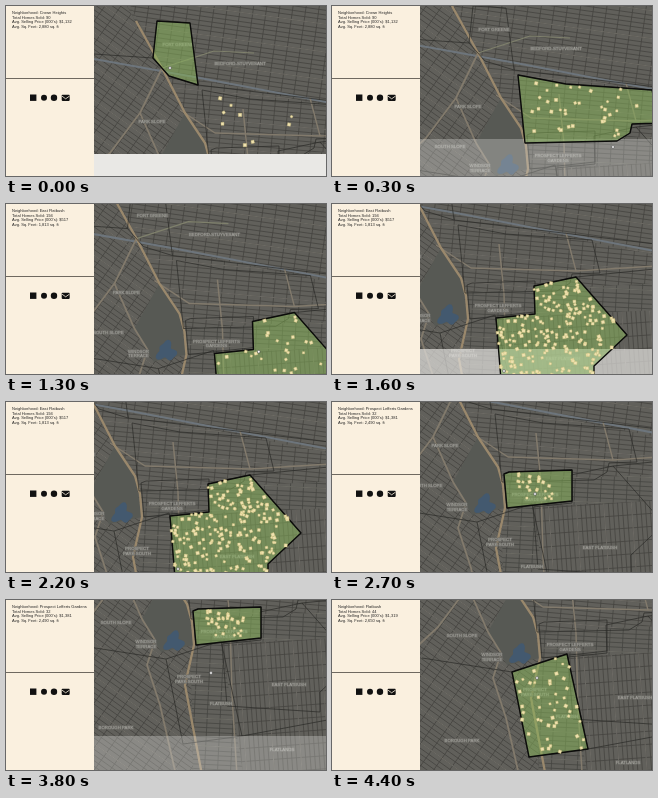
Recreate the animation shown at these times as an HTML page with a canvas. Size 320x170 px, loop 4.5 s.

```html
<!DOCTYPE html>
<html lang="en">
<head>
<meta charset="utf-8">
<title>Home sales map</title>
<style>
  html, body { margin: 0; width: 100%; height: 100%; overflow: hidden; background: #faf0df; }
  #stage { position: relative; width: 320px; height: 170px; overflow: hidden; }
  canvas, svg { position: absolute; left: 0; top: 0; width: 320px; height: 170px; }
  text { font-family: "Liberation Sans", Arial, sans-serif; font-size: 4.05px; fill: #222; }
</style>
</head>
<body>
<div id="stage">
  <canvas id="map"></canvas>
  <svg viewBox="0 0 320 170">
    <rect width="88" height="170" fill="#faf0df"/>
    <g id="stats">
      <text x="6" y="8"></text>
      <text x="6" y="12.6"></text>
      <text x="6" y="17.2"></text>
      <text x="6" y="21.8"></text>
    </g>
    <path d="M0 72.5H88" stroke="#6f6960"/>
    <g fill="#111">
      <rect x="24" y="88.5" width="6.4" height="6.4"/>
      <circle cx="38" cy="91.7" r="3"/>
      <circle cx="48" cy="91.7" r="3.2"/>
      <rect x="55.7" y="88.7" width="8" height="6.2" rx=".8"/>
      <path d="M55.8 90l3.9 2.8 3.9-2.8" fill="none" stroke="#faf0df" stroke-width=".8"/>
    </g>
  </svg>
</div>
<script>
const LOOP = 4500, STEP = 100, PAN = 300, FAR = 420;
const canvas = document.getElementById('map');
const ctx = canvas.getContext('2d');
const ratio = Math.max(1, window.devicePixelRatio || 1);
canvas.width = 320 * ratio;
canvas.height = 170 * ratio;
const lines = document.querySelectorAll('#stats text');

// Map coordinates are relative to the park lake.
const line = d => new Path2D('M' + d);
const shape = d => new Path2D('M' + d + 'Z');

const areas = {
  north: shape('-37-158L-4-156 4-94-25-103-41-121'),
  crown: shape('8-89L56-80 142-74 150-41 122-40 120-31 107-23 15-21'),
  east: shape('46 4L85 0 84-28 126-37 177 21 144 52 144 72 51 66'),
  gardens: shape('17-29L22-31 85-33 85-2 20 5'),
  flatbush: shape('-10 19L45 1 66 96 7 104')
};
const park = shape('-9-66L11-36 18 5-15 12-34-21');
const borders = line('-100-125L-41-121M4-94L205-70M126-37L205-45M-10 19L-100 5M66 96L205 70');

// Street blocks fan out from a corner: x, y, first and last bearing, street angle
const blocks = [
  [0, 0, 0, 6.3, .62],
  [14, -21, -2.06, 1.55, .05],
  [45, 4, -.05, 1.4, 1.5],
  [14, -21, -2.06, -.05, .09],
  [-28, -106, -2.06, .2, .14]
].map(([x, y, from, to, angle]) => {
  const clip = new Path2D();
  clip.moveTo(x, y);
  clip.arc(x, y, FAR, from, to);
  return { clip, angle };
});

const TAN = '#9a886c', DULL = '#827a6c';
const roads = [
  ['-100-120L6-101 205-63', 2, '#6d757c'],
  ['-32-111L20-128 60-126', 1.2, '#7f806c'],
  ['-14-69L21-46 126-43 205-48M126-43L116-81', 1.4, DULL],
  ['49-70L54-20 56 55 61 135', 1.5, DULL],
  ['-32-111L-54-66-84-26-112 0', 1.8, DULL],
  ['-54-66L-34-21-21 0-29 25-16 65 0 135', 1.8, DULL],
  ['-58-158L-32-111-9-66 11-36 16-18 18 5 9 45 19 98 26 135', 2.3, TAN]
];

const labels = [
  ['EAST FLATBUSH', 113, 46], ['SOUTH SLOPE', -60, -16], ['BOROUGH PARK', -60, 89],
  ['WINDSOR|TERRACE', -30, 3], ['PROSPECT|PARK SOUTH', 13, 38], ['FLATBUSH', 45, 65],
  ['FLATLANDS', 106, 111], ['PARK SLOPE', -42, -56], ['BEDFORD-STUYVESANT', 46, -114],
  ['PROSPECT LEFFERTS|GARDENS', 48, -7], ['FORT GREENE', -16, -133]
];

function seeded(seed) {
  return () => (seed = (seed * 16807) % 2147483647) / 2147483647;
}

// Scatter homes around a centre, keeping those inside the area.
function scatter(area, count, [x, y, rx, ry]) {
  const rnd = seeded(count * 97), homes = [];
  while (homes.length < count) {
    const px = x + rx * (rnd() * 2 - 1), py = y + ry * (rnd() * 2 - 1);
    if (ctx.isPointInPath(area, px, py)) homes.push([px, py, 2 + rnd() * 1.3, rnd() - .5]);
  }
  return homes;
}

const sales = [
  { at: 0, lead: -100, area: 'crown', name: 'Crown Heights', sold: 90, price: '1,132', feet: '2,880', around: [78, -56, 56, 30] },
  { at: 1200, area: 'east', name: 'East Flatbush', sold: 194, price: '517', feet: '1,813', around: [106, 15, 60, 48] },
  { at: 2400, area: 'gardens', name: 'Prospect Lefferts Gardens', sold: 32, price: '1,381', feet: '2,490', around: [50, -16, 20, 14] },
  { at: 4000, area: 'flatbush', name: 'Flatbush', sold: 44, price: '1,319', feet: '2,650', around: [28, 52, 38, 48] }
];
for (const s of sales) s.homes = scatter(areas[s.area], s.sold, s.around);

// Each pan: start time, where the lake ends up, where the pointer ends up
const pans = [
  [-PAN, 188, 173, 164, 62],
  [0, 178, 158, 281, 141],
  [1200, 118, 110, 172, 167],
  [2400, 155, 101, 203, 92],
  [3200, 160, 71, 203, 80],
  [3500, 170, 40, 205, 73],
  [3900, 190, 53, 205, 78]
];

// Unloaded tiles: time they start to fade in, top edge
const tiles = [[0, -25], [1500, 35], [3500, 96]];

function view(t) {
  const i = pans.filter(p => p[0] <= t).length - 1;
  const from = pans[Math.max(0, i - 1)], to = pans[i];
  const p = Math.min(1, (t - to[0]) / PAN), e = p * p * (3 - 2 * p);
  return to.map((v, k) => from[k] + (v - from[k]) * e).slice(1);
}

function stroke(path, width, color) {
  ctx.lineWidth = width;
  ctx.strokeStyle = color;
  ctx.stroke(path);
}

function fill(path, color) {
  ctx.fillStyle = color;
  ctx.fill(path);
}

function parallels(gap, across) {
  const path = new Path2D();
  for (let v = -FAR; v < FAR; v += gap) {
    path.moveTo(...(across ? [v, -FAR] : [-FAR, v]));
    path.lineTo(...(across ? [v, FAR] : [FAR, v]));
  }
  return path;
}
const streets = parallels(4.6), avenues = parallels(13, true), wide = parallels(27.6);

function drawBlock({ clip, angle }) {
  ctx.save();
  ctx.clip(clip);
  ctx.fillStyle = '#61605b';
  ctx.fillRect(-FAR, -FAR, 2 * FAR, 2 * FAR);
  ctx.rotate(angle);
  stroke(streets, .75, '#454440');
  stroke(avenues, .75, '#454440');
  stroke(wide, .8, '#74726b');
  ctx.restore();
}

function drawLake() {
  const lake = new Path2D();
  for (let a = 0; a < 6.28; a += .2) {
    const r = 9 + 2.2 * Math.sin(3 * a) + 1.5 * Math.cos(5 * a);
    lake.lineTo(-2 + r * Math.cos(a), 2 + r * Math.sin(a));
  }
  fill(lake, '#43596f');
}

function drawLabel([name, x, y]) {
  name.split('|').forEach((part, i) => {
    ctx.lineWidth = 1.4;
    ctx.strokeStyle = '#6f6e69';
    ctx.strokeText(part, x, y + i * 4.6);
    ctx.fillStyle = '#a9a8a2';
    ctx.fillText(part, x, y + i * 4.6);
  });
}

function drawMap() {
  blocks.forEach(drawBlock);
  fill(park, '#575954');
  drawLake();
  roads.forEach(([d, width, color]) => stroke(line(d), width, color));
  stroke(borders, .7, '#2a2a28');
  Object.values(areas).forEach(a => stroke(a, .7, '#2a2a28'));
  ctx.font = '4.3px "Liberation Sans", Arial, sans-serif';
  ctx.textAlign = 'center';
  labels.forEach(drawLabel);
}

function drawHome([x, y, size, turn]) {
  ctx.save();
  ctx.translate(x, y);
  ctx.rotate(turn);
  ctx.fillStyle = '#efe2b0';
  ctx.fillRect(-size / 2, -size / 2, size, size);
  ctx.lineWidth = .4;
  ctx.strokeStyle = '#d5c582';
  ctx.strokeRect(-size / 2, -size / 2, size, size);
  ctx.restore();
}

function draw(t) {
  const sale = sales.filter(s => s.at <= t).pop();
  const [x, y, px, py] = view(t);
  const age = t - sale.at;
  ctx.setTransform(ratio, 0, 0, ratio, 0, 0);
  ctx.lineJoin = 'round';
  ctx.save();
  ctx.beginPath();
  ctx.rect(88, 0, 232, 170);
  ctx.clip();
  ctx.translate(x, y);
  drawMap();
  for (const [from, top] of tiles) {
    if (t < from || t > from + 500) continue;
    ctx.fillStyle = `rgba(233,232,229,${Math.exp((from - t) / 250)})`;
    ctx.fillRect(-FAR, top, 2 * FAR, FAR);
  }

  // The hover outline follows the new stats a moment later.
  const before = sales[sales.indexOf(sale) - 1];
  const area = areas[age >= 100 ? sale.area : before ? before.area : 'north'];
  fill(area, 'rgba(138,184,90,.5)');
  stroke(area, 1.4, '#0b0b0a');
  const shown = Math.min(1, (age - (sale.lead || 0)) / (sale.lead ? 1000 : 400));
  sale.homes.slice(0, Math.round(sale.sold * shown)).forEach(drawHome);
  ctx.restore();

  ctx.beginPath();
  ctx.arc(px, py, 1.4, 0, 7);
  ctx.fillStyle = '#fff';
  ctx.fill();
  ctx.lineWidth = .5;
  ctx.strokeStyle = '#333';
  ctx.stroke();

  [`Neighborhood: ${sale.name}`, `Total Homes Sold: ${sale.sold}`,
    `Avg. Selling Price (000's): $${sale.price}`, `Avg. Sq. Feet: ${sale.feet} sq. ft`
  ].forEach((s, i) => { lines[i].textContent = s; });
}

const begin = performance.now();
let shownStep = -1;
function tick() {
  const step = Math.floor(((performance.now() - begin) % LOOP) / STEP);
  if (step !== shownStep) draw((shownStep = step) * STEP);
  requestAnimationFrame(tick);
}
tick();
</script>
</body>
</html>
```
